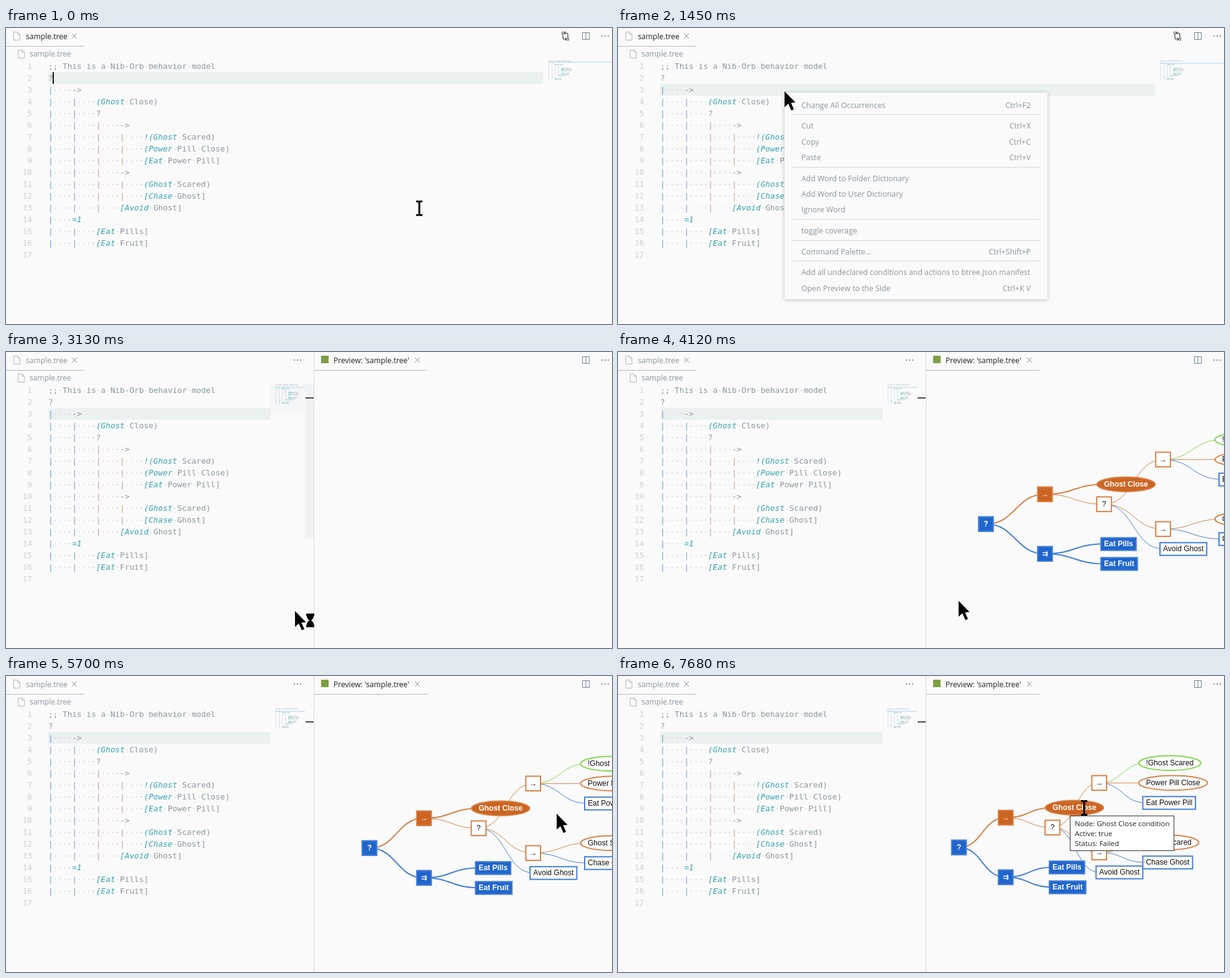
Recreate the animation shown at these times as an HTML page. Size 975 by 477 pixels, loop 8000 ms.

```html
<!DOCTYPE html>
<html lang="en">
<head>
<meta charset="utf-8">
<title>Behavior tree preview</title>
<style>
html, body { margin: 0; width: 100%; height: 100%; overflow: hidden; background: #fafafa; }
svg { display: block; }
text { white-space: pre; }
.ui { font-family: "Open Sans", "Noto Sans", sans-serif; font-size: 12.1px; fill: #8a969f; }
.menu { font-size: 12.3px; }
.tip { font-size: 11.5px; fill: #222; }
.code { font-family: "DejaVu Sans Mono", "Liberation Mono", monospace; font-size: 12.775px; fill: #8a979f; }
.num { fill: #cdd1d4; text-anchor: end; }
.accent { fill: #35a3b3; font-style: italic; }
.dot { fill: #cfd5d9; }
.node { font-family: "Liberation Sans", Arial, "DejaVu Sans", sans-serif; font-size: 12px; fill: #111; }
.node.on { font-weight: bold; fill: #fff; }
</style>
</head>
<body>
<script>
const NS = 'http://www.w3.org/2000/svg';

function el(parent, name, attrs = {}, text) {
  const e = document.createElementNS(NS, name);
  for (const k in attrs) e.setAttribute(k, attrs[k]);
  if (text !== undefined) e.textContent = text;
  parent.appendChild(e);
  return e;
}
const group = (parent, attrs) => el(parent, 'g', attrs);
const rect = (parent, x, y, width, height, fill) => el(parent, 'rect', { x, y, width, height, fill });
const line = (parent, d, stroke, width = 1) =>
  el(parent, 'path', { d, stroke, fill: 'none', 'stroke-width': width });
const label = (parent, x, y, text, cls = 'ui', extra = {}) =>
  el(parent, 'text', { x, y, class: cls, ...extra }, text);
const show = (e, on) => e.setAttribute('visibility', on ? 'visible' : 'hidden');
const move = (e, x, y) => e.setAttribute('transform', `translate(${x} ${y})`);

const svg = el(document.body, 'svg', { width: 975, height: 477, viewBox: '0 0 975 477' });
rect(svg, 0, 0, 975, 477, '#fafafa');

// ---------- editor ----------
const CODE = [
  [0, '', ';; This is a Nib-Orb behavior model'],
  [0, '', '?'],
  [1, '', '->'],
  [2, '(Ghost', ' Close)'],
  [2, '', '?'],
  [3, '', '->'],
  [4, '!(Ghost', ' Scared)'],
  [4, '(Power', ' Pill Close)'],
  [4, '[Eat', ' Power Pill]'],
  [3, '', '->'],
  [4, '(Ghost', ' Scared)'],
  [4, '[Chase', ' Ghost]'],
  [3, '[Avoid', ' Ghost]'],
  [1, '=1', ''],
  [2, '[Eat', ' Pills]'],
  [2, '[Eat', ' Fruit]'],
  [0, '', '']
];
const BARS = ['#5f9bd6', '#7d9ed2', '#c39a90', '#c59c80'];

const lineMark = rect(svg, 68, 71, 796, 19, '#ebf0f0');
CODE.forEach(([depth, accent, rest], i) => {
  const y = 66 + 19 * i;
  label(svg, 42, y, i + 1, 'code num');
  const row = label(svg, 68, y, '', 'code');
  for (let d = 0; d < depth; d++) {
    el(row, 'tspan', { fill: BARS[d] }, '|');
    el(row, 'tspan', { class: 'dot' }, '····');
  }
  if (accent) el(row, 'tspan', { class: 'accent' }, accent);
  rest.split(/( )/).forEach(part => {
    if (part === ' ') el(row, 'tspan', { class: 'dot' }, '·');
    else if (part) el(row, 'tspan', {}, part);
  });
});
const caret = rect(svg, 75, 71, 2, 19, '#111');

// ---------- minimap ----------
const slider = group(svg);
rect(slider, 426, 52, 55, 44, '#f4f6f7');
rect(slider, 481, 52, 14, 249, '#f1f2f4');
const mini = group(svg);
const miniMark = rect(mini, -1, 2, 103, 2, '#d3e6f4');
CODE.forEach(([depth, accent, rest], i) => {
  const y = 0.5 + 2 * i;
  for (let d = 0; d < depth; d++) rect(mini, d * 5, y - 0.5, 0.6, 2, '#c6d6e6');
  let x = depth * 5;
  const words = (accent + rest).split(' ');
  words.forEach((w, k) => {
    rect(mini, x, y, w.length, 1, accent && !k ? '#86c6cf' : '#bcc6cb');
    x += w.length + 1;
  });
});

// ---------- tabs and icons ----------
function fileIcon(x, y) {
  line(svg, `M${x} ${y}h6.5l3.5 3.5v9.5h-10zM${x + 6.5} ${y}v3.5h3.5`, '#b3babf');
}
function cross(parent, x, y) {
  line(parent, `M${x - 4} ${y - 4}l8 8m0 -8l-8 8`, '#8e979e');
}
function more(parent, x) {
  for (const d of [-5, 0, 5]) el(parent, 'circle', { cx: x + d, cy: 13, r: 1.1, fill: '#6f7a84' });
}
fileIcon(12.5, 6.5);
fileIcon(19.5, 35.5);
const tabName = label(svg, 32, 18, 'sample.tree');
label(svg, 38, 46, 'sample.tree');
cross(svg, 110, 13);
line(svg, 'M0 29.5H126', '#b4bcc0');
line(svg, 'M927.5 7.5h11v11h-11zM933 7.5v11', '#6f8299');
more(svg, 964);

const wide = group(svg);
line(wide, 'M896 10v5.5q0 2.5 2.5 2.5h2.5M899.5 15.5l2 2.5l-2 2.5M904 16v-5.5q0 -2.5 -2.5 -2.5h-2.5M900.5 5.5l-2 2.5l2 2.5', '#3c4248', 1.2);
el(wide, 'circle', { cx: 896, cy: 8, r: 1.8, fill: 'none', stroke: '#3c4248' });
el(wide, 'circle', { cx: 904, cy: 18, r: 1.8, fill: 'none', stroke: '#3c4248' });

const split = group(svg);
more(split, 469);
rect(split, 482, 73, 13, 2, '#4a4a4a');
line(split, 'M495.5 0V477', '#d8dadc');
line(split, 'M496 29.5H678', '#b4bcc0');
rect(split, 507, 6, 12, 12, '#7da043');
label(split, 527, 18, "Preview: 'sample.tree'", 'ui', { style: 'fill:#222' });
cross(split, 662, 13);

// ---------- tree: parent, depth, row, text, color, active, shape ----------
const INK = { blue: '#4580d8', orange: '#d88248', green: '#84d84f' };
const FILL = { blue: '#2166cc', orange: '#cc6522' };
const NODES = [
  [-1, 0, 8.5, '?', 'blue', 1, 'box'],
  [0, 1, 5.5, '→', 'orange', 1, 'box'],
  [0, 1, 11.5, '⇉', 'blue', 1, 'box'],
  [1, 2, 4.5, 'Ghost Close', 'orange', 1, 'oval'],
  [1, 2, 6.5, '?', 'orange', 0, 'box'],
  [2, 2, 10.5, 'Eat Pills', 'blue', 1, 'bar'],
  [2, 2, 12.5, 'Eat Fruit', 'blue', 1, 'bar'],
  [4, 3, 2, '→', 'orange', 0, 'box'],
  [4, 3, 9, '→', 'orange', 0, 'box'],
  [4, 3, 11, 'Avoid Ghost', 'blue', 0, 'bar'],
  [7, 4, 0, '!Ghost Scared', 'green', 0, 'oval'],
  [7, 4, 2, 'Power Pill Close', 'orange', 0, 'oval'],
  [7, 4, 4, 'Eat Power Pill', 'blue', 0, 'bar'],
  [8, 4, 8, 'Ghost Scared', 'orange', 0, 'oval'],
  [8, 4, 10, 'Chase Ghost', 'blue', 0, 'bar']
].map(([parent, depth, row, text, color, on, shape]) =>
  ({ parent, depth, y: 141.3 + 16 * row, text, color, on, shape }));

const tree = group(svg);
for (const n of NODES) {
  if (n.parent >= 0) n.edge = line(tree, '', INK[n.color], n.on ? 2 : 1);
}
for (const n of NODES) {
  n.g = group(tree);
  const cls = n.on ? 'node on' : 'node';
  const anchor = n.shape === 'box' ? 'middle' : 'start';
  const text = label(n.g, 0, 4, n.text, cls, { 'text-anchor': anchor });
  const w = text.getComputedTextLength();
  const look = { fill: n.on ? FILL[n.color] : '#fff', stroke: INK[n.color], 'stroke-width': 2 };
  let shape;
  if (n.shape === 'oval') {
    shape = el(n.g, 'ellipse', { cx: w / 2, cy: 0, rx: w / 2 + 11.5, ry: 11.8, ...look });
  } else {
    const box = n.shape === 'box'
      ? { x: -11.8, y: -11.8, width: 23.6, height: 23.6 }
      : { x: -5, y: -10, width: w + 10, height: 20.4 };
    shape = el(n.g, 'rect', { ...box, ...look });
  }
  n.g.insertBefore(shape, text);
}

function layTree(unit, panX, panY) {
  for (const n of NODES) {
    n.x = 497 + panX + unit * (n.depth + 1);
    move(n.g, n.x, n.y + panY);
    if (!n.edge) continue;
    const p = NODES[n.parent], mid = (p.x + n.x) / 2, y0 = p.y + panY, y1 = n.y + panY;
    n.edge.setAttribute('d', `M${p.x} ${y0}C${mid} ${y0} ${mid} ${y1} ${n.x} ${y1}`);
  }
}

// ---------- tooltip ----------
const tip = group(svg);
el(tip, 'rect', { x: 727.5, y: 225.5, width: 167, height: 56, fill: '#fff', stroke: '#333' });
['Node: Ghost Close condition', 'Active: true', 'Status: Failed'].forEach((s, i) =>
  label(tip, 735, 242 + 16 * i, s, 'ui tip'));

// ---------- context menu ----------
const menu = group(svg);
el(menu, 'rect', { x: 268, y: 104, width: 423, height: 333, fill: '#fafafa',
  style: 'filter:drop-shadow(0 1px 3px rgba(0,0,0,.25))' });
[
  [124, 'Change All Occurrences', 'Ctrl+F2'],
  [157, 'Cut', 'Ctrl+X'],
  [183, 'Copy', 'Ctrl+C'],
  [208, 'Paste', 'Ctrl+V'],
  [242, 'Add Word to Folder Dictionary'],
  [267, 'Add Word to User Dictionary'],
  [292, 'Ignore Word'],
  [326, 'toggle coverage'],
  [360, 'Command Palette...', 'Ctrl+Shift+P'],
  [393, 'Add all undeclared conditions and actions to btree.json manifest'],
  [419, 'Open Preview to the Side', 'Ctrl+K V']
].forEach(([y, text, keys]) => {
  label(menu, 295, y + 4.5, text, 'ui menu');
  if (keys) label(menu, 664, y + 4.5, keys, 'ui menu', { 'text-anchor': 'end' });
});
for (const y of [139.5, 224.5, 308.5, 342.5, 375.5]) line(menu, `M279 ${y}H679`, '#d3d7da');

// ---------- pointer ----------
const pointer = group(svg);
const press = el(pointer, 'circle', { cx: 0, cy: 0, r: 12, fill: '#fff200', opacity: 0.85 });
const arrow = el(pointer, 'path', { d: 'M0 0V25.5L6 20L11 31L15 29L10.3 18.5L17.5 18Z' });
const beam = el(pointer, 'path', {
  d: 'M-5 -12.5H-1L0 -11.5L1 -12.5H5V-9.5H1.5V9.5H5V12.5H1L0 11.5L-1 12.5H-5V9.5H-1.5V-9.5H-5Z' });
const busy = el(pointer, 'path', {
  d: 'M18 4H31V8H30Q30 12 26 15Q30 18 30 22H31V26H18V22H19Q19 18 23 15Q19 12 19 8H18Z' });

// ---------- motion: [first step, last step, steps, ...target] ----------
const POINTER = [
  [730, 870, 2, 268, 102],
  [1590, 1860, 3, 358, 417],
  [2290, 2430, 2, 465, 417.5],
  [3840, 3980, 2, 548, 401],
  [4700, 4700, 1, 695, 345],
  [4840, 4990, 2, 878, 213],
  [5560, 5700, 2, 886, 222],
  [5840, 5980, 2, 821.5, 229],
  [6690, 6690, 1, 798, 228],
  [6830, 7410, 5, 734, 212.5],
  [7680, 7680, 1, 750, 212.5]
];
const ZOOM = [[4130, 4420, 3, 70.7], [5270, 5700, 4, 87.8], [5840, 5980, 2, 75.2]];
const PAN = [[6690, 6690, 1, -23.6, -1]];

function glide(moves, start, t) {
  let v = start;
  for (const [t0, t1, n, ...to] of moves) {
    if (t < t0) break;
    const step = 1 + Math.floor((t - t0) / (t1 - t0 || 1) * (n - 1) + 0.01);
    const k = Math.min(n, step) / n;
    v = v.map((a, i) => a + (to[i] - a) * k);
  }
  return v;
}

function draw(t) {
  const within = (a, b) => t >= a && t < b;
  const clicked = t >= 1310, opened = t >= 2990;

  lineMark.setAttribute('y', clicked ? 90 : 71);
  lineMark.setAttribute('width', opened ? 358 : 796);
  caret.setAttribute('x', clicked ? 121 : 75);
  caret.setAttribute('y', clicked ? 90 : 71);
  show(caret, t < 140 || within(590, 870) || within(1310, 1450));

  move(mini, opened ? 434 : 873, 52);
  miniMark.setAttribute('y', clicked ? 4 : 2);
  miniMark.setAttribute('width', opened ? 48 : 103);
  show(slider, within(2990, 3420));
  tabName.style.fill = opened ? '#8a969f' : '#222';
  show(wide, !opened);
  show(split, opened);
  show(menu, within(1450, 2990));

  show(tree, t >= 3420);
  layTree(glide(ZOOM, [95], t)[0], ...glide(PAN, [0, 0], t));
  show(tip, t >= 7550);

  const isBeam = t < 1310 || t >= 7410;
  move(pointer, ...glide(POINTER, [665, 290.5], t));
  show(beam, isBeam);
  show(arrow, !isBeam);
  show(busy, within(2990, 3420));
  show(press, within(6550, 6830));
}

const begin = performance.now();
function tick() {
  draw((performance.now() - begin) % 8000);
  requestAnimationFrame(tick);
}
tick();
</script>
</body>
</html>
```
